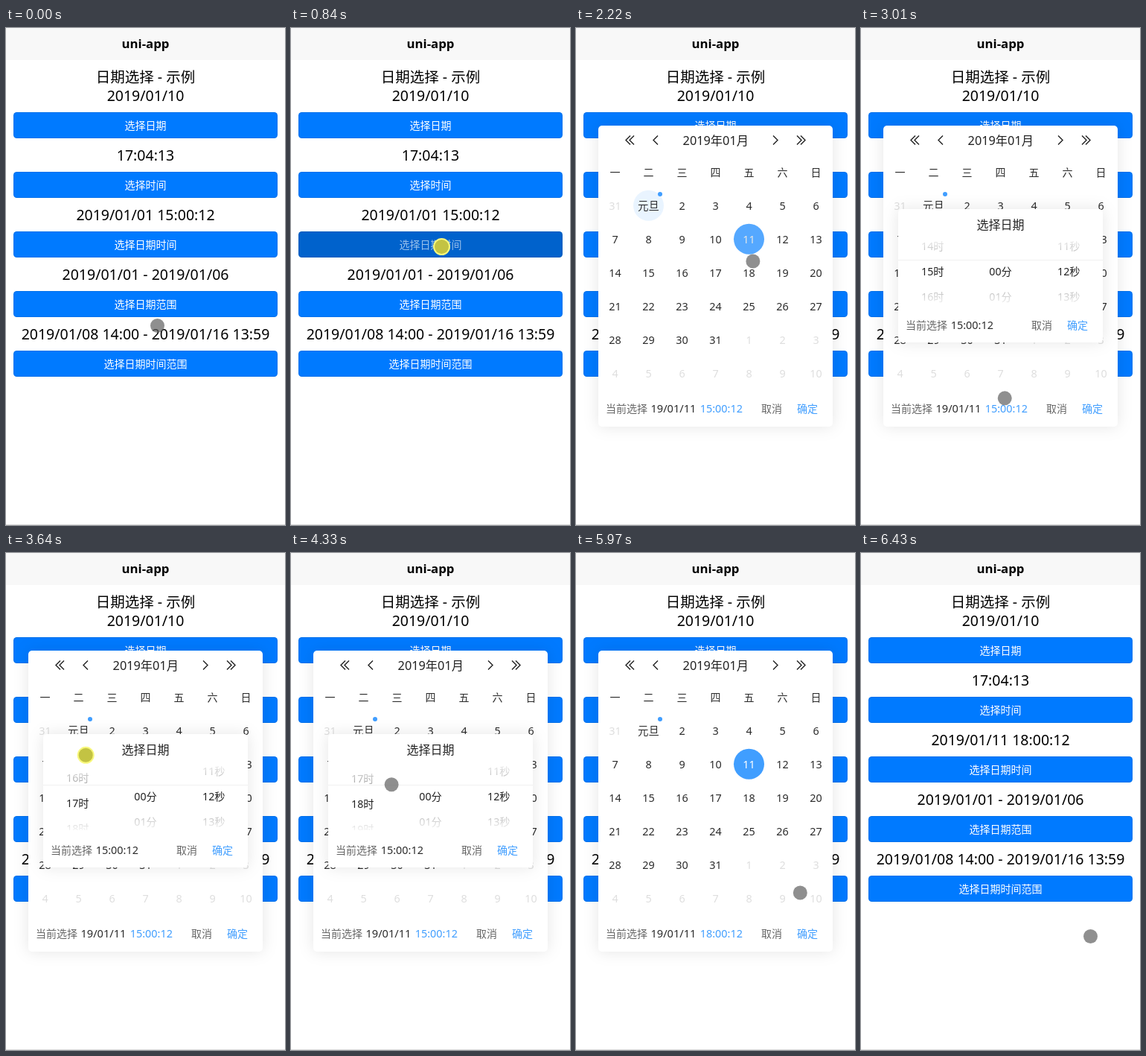
Recreate the animation shown at these times as an HTML page. Size 375 px wide and 667 px high, loop 6.88 s.

```html
<!DOCTYPE html>
<html lang="zh-CN">
<head>
<meta charset="utf-8">
<title>uni-app</title>
<style>
html, body { margin: 0; width: 100%; height: 100%; overflow: hidden; background: #fff; }
svg { display: block; width: 100%; height: 100%; }
text { font-family: "Noto Sans", "Noto Sans CJK SC", sans-serif; white-space: pre; }
.panel { fill: #fff; filter: drop-shadow(0 0 10px rgba(0, 0, 0, .1)); }
.icon { fill: none; stroke: #222; stroke-width: 1.4; }
.edge { fill: none; stroke: #000; stroke-opacity: .08; }
.label { font-weight: 500; }
</style>
</head>
<body>
<svg id="stage" viewBox="0 0 375 667"></svg>
<script>
const LOOP = 6880;
const ROW = 34;
const BLUE = '#409eff', DARK = '#2c2c2c', GRAY = '#666', PALE = '#dedede';
const T = { press: 840, open: 1060, pick: 2070, openTime: 2930, release: 4030, settled: 4800, closeTime: 5740, close: 6430 };

// Text centred vertically on cy
const left = (x, cy, str, fill, size = 14, attrs = '') =>
  `<text x="${x}" y="${(cy + size * 0.365).toFixed(2)}" font-size="${size}" fill="${fill}" ${attrs}>${str}</text>`;
const text = (x, cy, str, size, fill = '#000', attrs = '') =>
  left(x, cy, str, fill, size, 'text-anchor="middle" ' + attrs);
const rect = (x, y, w, h, fill, attrs = '') =>
  `<rect x="${x}" y="${y}" width="${w}" height="${h}" fill="${fill}" ${attrs}/>`;
const circle = (x, y, r, fill, attrs = '') => `<circle cx="${x}" cy="${y}" r="${r}" fill="${fill}" ${attrs}/>`;
const chevron = (x, dir) => `<path class="icon" d="M${x + 3 * dir} 144.5l${-6 * dir} 6l${6 * dir} 6"/>`;
const repeat = (n, draw) => Array.from({ length: n }, (_, i) => draw(i)).join('');
const actions = (x, y) => left(x, y, '取消', GRAY) + left(x + 48, y, '确定', BLUE);

function page() {
  const rows = [
    ['2019/01/10', '选择日期'],
    ['17:04:13', '选择时间'],
    ['', '选择日期时间'],
    ['2019/01/01 - 2019/01/06', '选择日期范围'],
    ['2019/01/08 14:00 - 2019/01/16 13:59', '选择日期时间范围']
  ];
  return rect(0, 0, 375, 667, '#fff') + rect(0, 0, 375, 43, '#f8f8f8') + rect(0, 666, 375, 1, '#dcdcdc') +
    text(187.5, 21, 'uni-app', 16.8, '#000', 'font-weight="700"') +
    text(187.5, 66, '日期选择 - 示例', 19.5) +
    rows.map(([value, label], i) => {
      const y = 91 + i * 80;
      return text(187.5, y, value, 19.5, '#000', `id="value${i}"`) +
        rect(10, y + 22, 355, 35, '#007aff', `rx="4.5" id="button${i}"`) +
        rect(10.5, y + 22.5, 354, 34, 'none', 'rx="4" class="edge"') +
        text(187.5, y + 40, label, 14, '#fff', `class="label" id="label${i}"`);
    }).join('');
}

function calendar() {
  const colX = c => 52.5 + c * 45;
  const cell = n => {
    const inMonth = n >= 1 && n <= 31;
    return text(colX(n % 7), 238.5 + Math.floor(n / 7) * 45, (n + 30) % 31 + 1, 14.4,
      inMonth ? DARK : PALE, `id="cell${n}"`);
  };
  return '<g id="calendar">' + rect(30, 131, 315, 404, '#fff', 'class="panel" rx="5"') +
    chevron(70, 1) + chevron(75, 1) + chevron(107, 1) +
    chevron(268, -1) + chevron(300, -1) + chevron(305, -1) +
    text(187.8, 151, '2019年01月', 16.3, '#222') +
    repeat(7, i => text(colX(i), 194, '一二三四五六日'[i], 14, DARK)) +
    circle(97.5, 238.3, 20.5, BLUE, 'id="oldPick"') + circle(232.5, 283.3, 20.5, BLUE, 'id="newPick"') +
    repeat(42, cell) + circle(113, 223, 3, BLUE, 'id="dot"') +
    left(40, 511, '当前选择', GRAY) +
    left(100.5, 511, '', DARK, 14.6, 'id="date"') +
    left(166.8, 511, '', BLUE, 14.4, 'id="time"') +
    actions(249, 511) + '</g>';
}

function timePanel() {
  const wheel = (id, x, count, unit) => `<g id="${id}">` +
    repeat(count, i => text(x, 327 + i * ROW, String(i).padStart(2, '0') + unit, 14.2, '#222')) + '</g>';
  return '<g id="timePanel">' + rect(50, 243, 275, 179, '#fff', 'class="panel" rx="5"') +
    text(187.5, 264, '选择日期', 16, '#222') +
    '<g clip-path="url(#wheelClip)">' +
    wheel('hours', 96.3, 24, '时') + wheel('minutes', 187.5, 60, '分') + wheel('seconds', 279.3, 60, '秒') +
    rect(50, 282, 275, 28, 'url(#fadeTop)') + rect(50, 344, 275, 28, 'url(#fadeBottom)') + '</g>' +
    rect(50, 311, 275, 1, '#f0f0f0') +
    left(60, 399, '当前选择', GRAY) + left(120.8, 399, '', DARK, 14.4, 'id="panelTime"') +
    actions(229, 399) + '</g>';
}

const fade = (id, a, b) => `<linearGradient id="${id}" x1="0" y1="0" x2="0" y2="1">
  <stop offset="0" stop-color="#fff" stop-opacity="${a}"/><stop offset="1" stop-color="#fff" stop-opacity="${b}"/></linearGradient>`;

const stage = document.getElementById('stage');
stage.innerHTML = `<defs>${fade('fadeTop', 0.95, 0.6)}${fade('fadeBottom', 0.6, 0.95)}
  <clipPath id="wheelClip">${rect(50, 282, 275, 90, '#000')}</clipPath></defs>` +
  page() + calendar() + timePanel() +
  `<g id="cursor">${circle(0, 0, 11.5, '#f8f87c', 'id="ring"')}${circle(0, 0, 9.5, '#606060', 'id="tip"')}</g>`;

const el = {};
stage.querySelectorAll('[id]').forEach(node => { el[node.id] = node; });

// Each move eases to (x, y); bend bows the path sideways; press is the touch that belongs to it
const home = { x: 203.5, y: 399.5 };
const grab = { x: 107.2, y: 330 };
const moves = [
  { from: 70, to: 690, x: 202.5, y: 293.5, press: [T.press, 920] },
  { from: 1140, to: 1800, x: 232.5, y: 284, press: [1840, 1910] },
  { from: T.pick, to: 2760, x: 200, y: 510, bend: 22, press: [2790, 2860] },
  { from: T.openTime, to: 3420, ...grab },
  { from: 3500, to: 3640, x: grab.x, y: 271.3, press: [3500, T.release] },
  { from: T.release, to: 5080, x: 294.5, y: 400.5, bend: -26, press: [5200, 5350] },
  { from: T.closeTime, to: 6210, x: 308.5, y: 514.5, press: [6300, T.close] }
];

const progress = (t, a, b) => Math.min(1, Math.max(0, (t - a) / (b - a)));
const ease = u => u * u * (3 - 2 * u);
const easeOut = u => 1 - (1 - u) ** 3;
const during = (t, a, b) => t >= a && t < b;
const show = (node, on) => node.setAttribute('display', on ? 'inline' : 'none');
const write = (node, str) => { if (node.textContent !== str) node.textContent = str; };
const spin = (node, value) => node.setAttribute('transform', `translate(0 ${-ROW * value})`);

function cursorAt(t) {
  let { x, y } = home;
  for (const { from, to, x: tx, y: ty, bend = 0 } of moves) {
    if (t < from) break;
    const e = ease(progress(t, from, to));
    const dx = tx - x, dy = ty - y;
    const bow = 4 * e * (1 - e) * bend / Math.hypot(dx, dy);
    x += dx * e + dy * bow;
    y += dy * e - dx * bow;
  }
  return { x, y };
}

// The hour wheel follows the finger, then runs on to 18
function hourAt(t) {
  const { y } = cursorAt(Math.min(t, T.release));
  const dragged = t < 3500 ? 15 : 15 + (grab.y - y) / ROW;
  return dragged + (18 - dragged) * easeOut(progress(t, T.release, T.settled));
}

function render(t) {
  const picked = t >= T.pick;
  const mix = progress(t, T.pick, T.pick + 170);
  const shade = Math.round(44 + 211 * mix);

  write(el.value2, t < T.close ? '2019/01/01 15:00:12' : '2019/01/11 18:00:12');
  const held = during(t, T.press, T.open);
  el.button2.setAttribute('fill', held ? '#0062cc' : '#007aff');
  el.label2.setAttribute('fill-opacity', held ? 0.6 : 1);

  show(el.calendar, during(t, T.open, T.close));
  el.oldPick.setAttribute('opacity', 1 - mix);
  el.newPick.setAttribute('opacity', mix);
  write(el.cell1, picked ? '元旦' : '1');
  el.cell1.setAttribute('fill', picked ? DARK : '#fff');
  el.cell11.setAttribute('fill', `rgb(${shade},${shade},${shade})`);
  show(el.dot, picked);
  write(el.date, picked ? '19/01/11' : '19/01/01');
  write(el.time, t < T.closeTime ? '15:00:12' : '18:00:12');

  show(el.timePanel, during(t, T.openTime, T.closeTime));
  write(el.panelTime, t < T.settled + 200 ? '15:00:12' : '18:00:12');
  spin(el.hours, hourAt(t));
  spin(el.minutes, 0);
  spin(el.seconds, 12);

  const down = moves.some(({ press }) => press && during(t, ...press));
  const { x, y } = cursorAt(t);
  show(el.ring, down);
  el.tip.setAttribute('fill', down ? '#c3c343' : '#606060');
  el.tip.setAttribute('fill-opacity', down ? 1 : 0.7);
  el.cursor.setAttribute('transform', `translate(${x} ${y})`);
}

const start = performance.now();
function tick() {
  render((performance.now() - start) % LOOP);
  requestAnimationFrame(tick);
}
tick();
</script>
</body>
</html>
```
